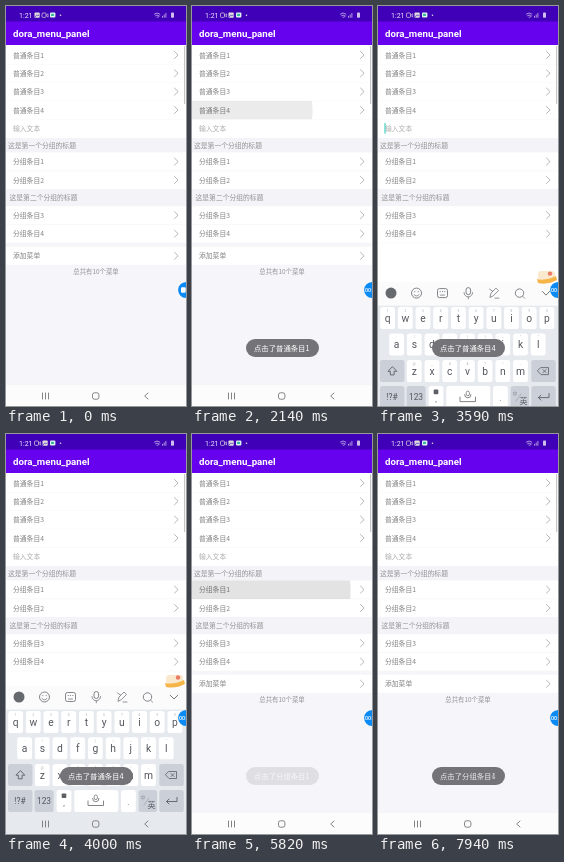
Recreate the animation shown at these times as an HTML page. Size 180 px wide and 400 px high, loop 7990 ms.

```html
<!DOCTYPE html>
<html lang="zh">
<head>
<meta charset="utf-8">
<style>
html, body { margin: 0; width: 100%; height: 100%; overflow: hidden; background: #f6f6fa; }
svg { display: block; width: 180px; height: 400px; font-family: "Noto Sans CJK SC", "Noto Sans CJK", Roboto, sans-serif; }
.line { fill: none; stroke-linecap: round; stroke-linejoin: round; }
.key { font-family: Roboto, sans-serif; text-anchor: middle; fill: #54575d; }
</style>
</head>
<body>
<svg id="stage" viewBox="0 0 180 400"></svg>
<script>
const LOOP = 7990;
const rect = (x, y, w, h, fill, r = 0, extra = '') =>
  `<rect x="${x}" y="${y}" width="${w}" height="${h}" rx="${r}" fill="${fill}" ${extra}/>`;
const text = (x, y, size, fill, s, extra = '') =>
  `<text x="${x}" y="${y}" font-size="${size}" fill="${fill}" ${extra}>${s}</text>`;
const line = (d, color, w = 0.8) =>
  `<path class="line" d="${d}" stroke="${color}" stroke-width="${w}"/>`;
const key = (x, y, size, s, extra = '') =>
  `<text class="key" x="${x}" y="${y}" font-size="${size}" ${extra}>${s}</text>`;

const row = (y, label) => rect(0, y, 180, 18, '#fff') +
  text(7, y + 11.6, 6.8, '#808080', label) +
  line(`M168.5 ${y + 5.5}l3.6 3.5l-3.6 3.5`, '#a4a4a4', 0.8);
const header = (y, h, x, label) => rect(0, y, 180, h, '#f4f4f8') +
  text(x, y + h / 2 + 2.5, 6.8, '#929292', label);

const navIcons = line('M36.5 387v6M39.5 387v6M42.5 387v6', '#777', 0.9) +
  rect(86.5, 386.8, 6.4, 6.4, 'none', 2, 'stroke="#777" stroke-width=".9"') +
  line('M142 387l-3.3 3l3.3 3', '#777', 0.9);

const statusBar = rect(0, 0, 180, 15.5, '#3f00b8') +
  text(13, 11.6, 7, '#f0eaff', '1:21', 'font-family="Roboto, sans-serif"') +
  '<g id="cameraIcon">' + rect(28.5, 7, 4, 4.4, 'none', 1, 'stroke="#ddd" stroke-width=".7"') +
  line('M33 9l1.6-1.2v3z', '#ddd', 0.6) + '</g>' +
  '<g id="pictureIcon">' + rect(36.5, 6.5, 5.2, 5.2, '#ddd', 0.8) +
  line('M37.3 10.8l1.6-2l1 1l.8-.6', '#3b00b5', 0.6) + '</g>' +
  rect(44, 6.4, 5.4, 5.2, '#dff3f0', 1) + rect(45, 7.8, 3, 2.2, '#36b79b', 0.5) +
  '<circle cx="54.5" cy="9.2" r=".8" fill="#ddd"/>' +
  '<g opacity=".75">' +
  line('M148.4 8a4.3 4.3 0 0 1 5.4 0M149.6 9.6a2.4 2.4 0 0 1 3 0M151.1 11v.2M152 11.4l1.6-1.6', '#fff', 0.8) +
  line('M156.5 11.3v-1M158.2 11.3v-2.4M159.9 11.3v-4', '#fff', 0.8) +
  rect(165, 6.4, 3, 5.4, '#fff', 0.8) + '</g>';

const page = rect(0, 0, 180, 400, '#f6f6fa') + rect(0, 39, 180, 93, '#fff') +
  row(40, '普通条目1') + row(58.3, '普通条目2') + row(76.6, '普通条目3') + row(95, '普通条目4') +
  text(7, 124.7, 6.8, '#acacac', '输入文本') +
  header(132, 14.4, 2, '这是第一个分组的标题') + row(146.6, '分组条目1') + row(165, '分组条目2') +
  header(183.3, 16.7, 3.5, '这是第二个分组的标题') + row(200.2, '分组条目3') + row(218.7, '分组条目4') +
  row(240.8, '添加菜单') +
  [58.3, 76.6, 95, 113.3, 165, 218.5].map(y => rect(0, y - 0.25, 180, 0.5, '#f6f6f8')).join('') +
  text(90, 267.5, 6.4, '#929292', '总共有10个菜单', 'text-anchor="middle"') +
  rect(0, 379, 180, 21, '#fcfcfd') + navIcons;

// Soft keyboard
const keyRow = (letters, x0, y, hints) => [...letters].map((c, i) => {
  const x = x0 + i * 17.7;
  return rect(x - 7.4, y - 11, 14.8, 22, '#fff', 2.6) + key(x, y + 3.8, 10.3, c) +
    key(x, y - 6.4, 3.2, hints[i], 'opacity=".5"');
}).join('');
const grayKey = (x, y, w) => rect(x, y - 11, w, 22, '#cacfd8', 2.6);
const ink = '#74777c', dark = '#5c5f65';
const ring = (x, r) => `<circle cx="${x}" cy="263" r="${r}" fill="none" stroke="${ink}" stroke-width=".9"/>`;
const toolbar = rect(0, 252, 180, 23.5, '#fbfbfc') +
  '<circle cx="13" cy="263" r="5.5" fill="#66696d"/>' +
  ring(38.5, 5) + line('M36 264.5q2.5 3 5 0M36.8 261.3v.4M40.2 261.3v.4', ink) +
  rect(59.5, 258.5, 10, 9, 'none', 2, `stroke="${ink}" stroke-width=".9"`) +
  line('M62 261.5h.4M64.3 261.5h.4M66.6 261.5h.4M62.5 265h4', ink) +
  rect(88, 257.5, 4.6, 7, 'none', 2.3, `stroke="${ink}" stroke-width=".9"`) +
  line('M86 262.5a4.3 4.3 0 0 0 8.6 0M90.3 267v1.8', ink) +
  line('M112 267l1-4l5-5l2.5 2.5l-5 5zM117 268h4M111.5 259l3 2', ink) +
  ring(141.5, 4.2) + line('M144.6 266.2l2 2', ink) + line('M164.3 261.3l3.7 3.7l3.7-3.7', ink, 1);
const sticker = rect(160, 241, 17, 9, '#fbe9cf', 3) +
  '<path d="M159 249q9 2 19-3l1 4q-9 5-19 3z" fill="#f6b548"/>' +
  '<circle cx="172" cy="243.5" r="2.2" fill="#ec7a62"/>';
const keyboard = toolbar + sticker +
  rect(0, 275.5, 180, 260, '#e6e9ee') +
  keyRow('qwertyuiop', 9.6, 288, '1234567890') +
  keyRow('asdfghjkl', 18.6, 314.3, '-/:;()~“”') +
  grayKey(2, 341, 24.5) + keyRow('zxcvbnm', 36.3, 341, '@_#&?!…') + grayKey(153.3, 341, 24.5) +
  line('M14.2 336.8l-4.2 4.4h2.3v3.6h3.8v-3.6h2.3z', dark, 0.9) +
  line('M163 337.5h7.5v7h-7.5l-3.3-3.5zM165 339.5l3 3M168 339.5l-3 3', dark, 0.8) +
  grayKey(2, 367, 24.5) + key(14, 370, 8.4, '!?#') + grayKey(28.6, 367, 19) + key(38, 370, 8.4, '123') +
  rect(50.6, 356, 14.8, 22, '#fff', 2.6) + key(58, 371.5, 8, ',') + rect(55.7, 359.5, 4.6, 4.6, dark, 0.8) +
  rect(68.3, 356, 44, 22, '#fff', 2.6) +
  line('M82 367v4.5h15.5v-4.5M86.6 364.5a3.2 3.2 0 0 0 6.4 0', '#777', 0.9) +
  rect(88.2, 361, 3.2, 4.6, 'none', 1.6, 'stroke="#777" stroke-width=".8"') +
  rect(115, 356, 14.8, 22, '#fff', 2.6) + key(122.4, 371, 8, '.') +
  grayKey(132.6, 367, 18.5) + text(134.5, 365, 5, '#8b8f96', '中') + text(141.5, 373.5, 8, dark, '英') +
  line('M138 371l5-7', '#8b8f96', 0.5) + grayKey(153.3, 367, 24.5) +
  line('M171 363.5v4h-10.5M163 365l-2.5 2.5l2.5 2.5', dark, 0.9) + navIcons;

const toastText = id => text(62, 344.7, 7.35, '#fff', '', `id="${id}"`);

stage.innerHTML = '<defs><clipPath id="rowClip"><rect id="clipRect" width="180" height="18.3"/></clipPath></defs>' + page +
  '<g clip-path="url(#rowClip)"><circle id="ripple" fill="#000"/></g>' +
  rect(6.5, 117, 1, 10.6, '#25c9b8', 0, 'id="cursor"') +
  rect(0, 237.2, 180, 163, '#fff', 0, 'id="cover"') +
  rect(178, 40, 1.2, 58, '#c6c6c6', 0.6) +
  rect(0, 15, 180, 24, '#6602ee') + statusBar +
  text(7, 31.2, 9.7, '#fff', 'dora_menu_panel', 'font-family="Roboto, sans-serif" font-weight="700"') +
  `<g id="ime">${keyboard}</g>` +
  '<g id="toast">' + rect(54, 333, 73, 18, '#747478', 9) + toastText('oldText') + toastText('newText') + '</g>' +
  '<circle cx="180.2" cy="284" r="8.1" fill="#0a8af5"/>' +
  '<g id="camera">' + rect(175, 281.3, 4.6, 5.4, '#fff', 1) + '<path d="M179 284l3-2v4z" fill="#fff"/></g>' +
  text(173, 286, 5.4, '#fff', '00:03', 'id="timer" font-family="Roboto, sans-serif" font-weight="500"');

const el = id => document.getElementById(id);
const set = (id, attrs) => { for (const k in attrs) el(id).setAttribute(k, attrs[k]); };
const ramp = (t, a, b) => Math.min(1, Math.max(0, (t - a) / (b - a)));
const within = (t, a, b) => t >= a && t < b;

// start, row top, touch x, first radius, strength
const taps = [
  [290, 40, 60, 65, .08],
  [2140, 95, 56, 64, .08],
  [5820, 146.6, 62, 96, .11],
  [7390, 218.7, 60, 65, .08]
];
const blinks = [[3500, 4000], [4160, 4660], [5220, 5800], [7220, 7720]];

function draw(t) {
  const tap = taps.find(([start]) => within(t, start, start + 360));
  set('ripple', { opacity: 0 });
  if (tap) {
    const [start, y, x, r, strength] = tap, age = t - start;
    set('clipRect', { y });
    set('ripple', { cx: x, cy: y + 10, r: r + age * 0.6, opacity: strength * (1 - ramp(age, 120, 360)) });
  }

  set('cursor', { opacity: +blinks.some(([a, b]) => within(t, a, b)) });

  // Keyboard slides up with deceleration, leaves accelerating
  const rise = 148 * (1 - ramp(t, 3400, 3760)) ** 2.4;
  const fall = 150 * ramp(t, 4785, 4940) ** 2;
  const open = within(t, 3420, 4940);
  set('ime', { transform: `translate(0 ${rise + fall})`, opacity: +open });
  set('cover', { opacity: open ? 1 - ramp(t, 4760, 4940) : 0 });

  const first = t < 5400;
  const swap = first ? ramp(t, 2500, 2890) : ramp(t, 7750, 8140);
  const group = first ? '普通' : '分组';
  el('oldText').textContent = `点击了${group}条目1`;
  el('newText').textContent = `点击了${group}条目4`;
  set('oldText', { opacity: 1 - swap });
  set('newText', { opacity: swap });
  const shown = first
    ? ramp(t, 400, 890) * (1 - ramp(t, 4640, 4860))
    : t < 5820 ? 0 : ramp(t, 5730, 6260);
  set('toast', { opacity: shown });

  // Recording starts: the bubble shows a timer and the status icons trade places
  const recording = t >= 30;
  set('camera', { opacity: +!recording });
  set('timer', { opacity: +recording });
  set('cameraIcon', { transform: `translate(${recording ? 0 : 7.5} 0)` });
  set('pictureIcon', { transform: `translate(${recording ? 0 : -8} 0)` });
}

function frame(now) {
  draw(now % LOOP);
  requestAnimationFrame(frame);
}
draw(0);
requestAnimationFrame(frame);
</script>
</body>
</html>
```
